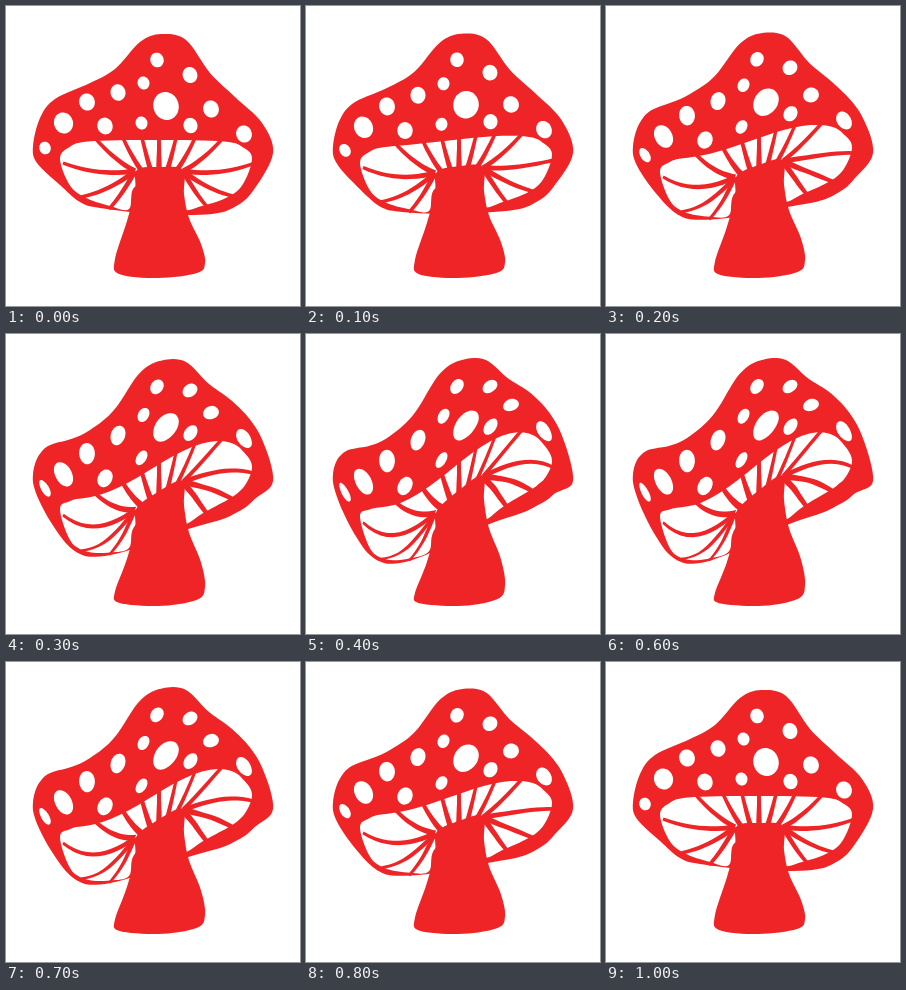
An HTML page with a canvas for the animation above (1.1 s loop, 294x300 px).

```html
<!DOCTYPE html>
<html>
<head>
<meta charset="utf-8">
<title>Mushroom</title>
<style>
html, body { margin: 0; width: 100%; height: 100%; overflow: hidden; background: #fff; }
canvas { display: block; }
</style>
</head>
<body>
<canvas id="stage" width="294" height="300"></canvas>
<script>
const ctx = document.getElementById('stage').getContext('2d');
const RED = '#ee2426', WHITE = '#fff';
const STEP = 100, STEPS = 11, HALF = 5;
const GILL_X = 150, HUB_X = 153, HUB_Y = 165, HUB_R = 24;

const cap = [
  [27, 140], [34, 112], [49, 93], [84, 77], [109, 63], [134, 36], [155, 28], [180, 34],
  [204, 67], [229, 91], [256, 117], [267, 147], [249, 182], [232, 199], [206, 208],
  [150, 208], [94, 202], [74, 196], [54, 179], [31, 157]
];
const gillSide = [[68, 135.5], [88, 142], [96, 153], [87, 178], [72, 191], [46, 200], [27, 203], [20, 180]];
const stem = [
  [131, 164], [154, 161], [177, 164], [178, 188], [183, 212], [195, 238], [199, 257],
  [191, 267], [152, 272], [113, 268], [109, 253], [121, 215], [129, 184]
];
// x, y, radius
const spots = [
  [151, 54, 7], [184, 69, 7.7], [137.5, 77, 6.2], [81, 96, 8.2], [112, 86.5, 7.8],
  [160, 100, 13.3], [205, 103, 8.2], [238, 128, 8.2], [184.5, 119.5, 7.3],
  [135.5, 117, 6.2], [99, 120, 8], [57.5, 117, 10], [39, 142, 6]
];
// distance from the hub axis, y at the rim
const rays = [[0, 132], [17, 132], [36, 132], [64, 132], [96, 157], [78, 191], [50, 203]];

// Lean grows over the first half of the loop and then returns
function lean(step) {
  const p = Math.min(step, STEPS - 1 - step) / HALF;
  return 1.08 * Math.sin(Math.PI / 2 * p ** 0.9) ** 2;
}

// Flag-like bend: sides, middle and foot stay put
function bend(amount) {
  return ([x, y]) => {
    const u = Math.min(1, Math.max(0, (x - 27) / 240));
    const gain = Math.max(0, Math.min(1.2, 0.7 + (y - 65) * 0.01, (272 - y) * 0.0135));
    return [x, y + 323 * amount * gain * u * (1 - u) * (1 - 2 * u)];
  };
}

function spline(points) {
  const n = points.length, out = [];
  for (let i = 0; i < n; i++) {
    const [p, q, r, t] = [-1, 0, 1, 2].map(k => points[(i + k + n) % n]);
    for (let s = 0; s < 1; s += 0.125) {
      out.push([0, 1].map(k => {
        const a = p[k], b = q[k], c = r[k], d = t[k];
        return b + 0.5 * s * (c - a + s * (2 * a - 5 * b + 4 * c - d + s * (3 * (b - c) + d - a)));
      }));
    }
  }
  return out;
}

function mirror(side, axis) {
  const right = side.map(([dx, y]) => [axis + dx, y]);
  const left = side.map(([dx, y]) => [axis - dx, y]).reverse();
  return [[axis, 134], ...right, ...left];
}

// Slightly tall oval, tipped to the left
function oval([x, y, r]) {
  const tilt = -0.3;
  return Array.from({ length: 40 }, (_, i) => {
    const a = i * Math.PI / 20;
    const px = 0.95 * r * Math.cos(a), py = 1.06 * r * Math.sin(a);
    return [x + px * Math.cos(tilt) - py * Math.sin(tilt), y + px * Math.sin(tilt) + py * Math.cos(tilt)];
  });
}

// Sagging ray that thickens toward the hub
function ray(dx, y, side) {
  const x0 = HUB_X + side * dx;
  const x1 = HUB_X + side * HUB_R * Math.min(1, dx / 50);
  const above = [], below = [];
  for (let i = 0; i <= 12; i++) {
    const s = i / 12;
    const px = x0 + (x1 - x0) * s;
    const py = y + (HUB_Y - y) * s + dx * 0.2 * s * (1 - s);
    const tx = x1 - x0, ty = HUB_Y - y + dx * 0.2 * (1 - 2 * s);
    const w = (1.7 + 0.9 * s) / Math.hypot(tx, ty);
    above.push([px - ty * w, py + tx * w]);
    below.unshift([px + ty * w, py - tx * w]);
  }
  return above.concat(below);
}

const layers = [
  [spline(cap), RED],
  [spline(mirror(gillSide, GILL_X)), WHITE],
  ...rays.flatMap(([dx, y]) => [[ray(dx, y, -1), RED], [ray(dx, y, 1), RED]]),
  ...spots.map(s => [oval(s), WHITE]),
  [spline(stem), RED]
];

function fill(points, color) {
  ctx.fillStyle = color;
  ctx.beginPath();
  points.forEach(([x, y]) => ctx.lineTo(x, y));
  ctx.closePath();
  ctx.fill();
}

function draw() {
  const step = Math.floor(performance.now() / STEP) % STEPS;
  const warp = bend(lean(step));
  ctx.fillStyle = WHITE;
  ctx.fillRect(0, 0, 294, 300);
  for (const [points, color] of layers) fill(points.map(warp), color);
  requestAnimationFrame(draw);
}
draw();
</script>
</body>
</html>
```
